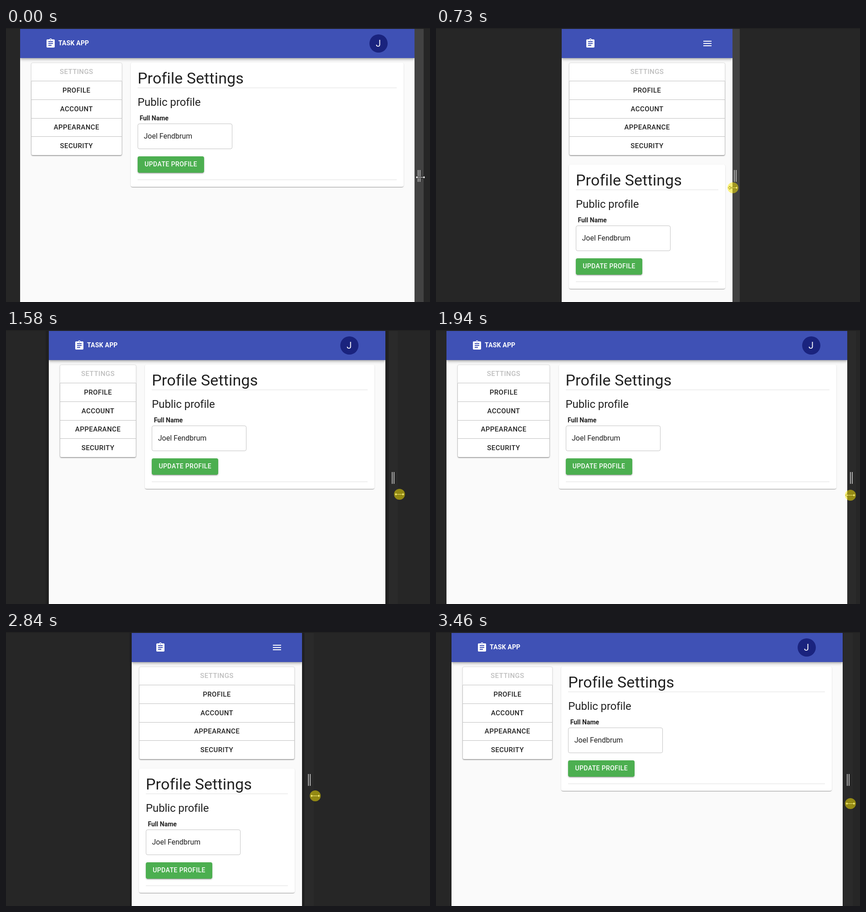
An HTML page that plays this animation: 931x602 px, repeating every 3490 ms.

```html
<!DOCTYPE html>
<html lang="en">
<head>
<meta charset="utf-8">
<title>Responsive profile page</title>
<style>
html, body { margin: 0; width: 100%; height: 100%; overflow: hidden; background: #262626; }
body { position: relative; font-family: Roboto, sans-serif; color: rgba(0,0,0,.87);
  --nav: max(143px, (100% - 68px) / 4);
  --low: 0 2px 1px -1px rgba(0,0,0,.2), 0 1px 1px rgba(0,0,0,.14), 0 1px 3px rgba(0,0,0,.12);
  --mid: 0 3px 1px -2px rgba(0,0,0,.2), 0 2px 2px rgba(0,0,0,.14), 0 1px 5px rgba(0,0,0,.12);
  --high: 0 2px 4px -1px rgba(0,0,0,.2), 0 4px 5px rgba(0,0,0,.14), 0 1px 10px rgba(0,0,0,.12); }
body * { position: absolute; box-sizing: border-box; white-space: nowrap; }
#top { left: 0; top: 0; width: 100%; height: 2px; background: #212121; }
#back { top: 2px; bottom: 0; background: #202020; }
#strip { top: 2px; bottom: 0; width: 20px; background: #2a2a2a; }
#strip.lit { background: #424242; }
#strip b { left: 7px; top: 310px; width: 6px; height: 26px; border: solid #adadad; border-width: 0 2px; }
#page { top: 2px; bottom: 0; background: #fafafa; overflow: hidden; }

header { left: 0; top: 0; width: 100%; height: 64px; background: #3f51b5; color: #fff; box-shadow: var(--high); }
header svg { width: 24px; height: 24px; top: 20px; fill: #fff; }
#clip { left: 55px; }
#brand { left: 84px; top: 19px; font: 700 14px/24px Roboto, sans-serif; letter-spacing: .2px; }
#face { right: 59.5px; top: 12px; width: 40px; height: 40px; border-radius: 50%; background: #1a237e;
  font-size: 20px; line-height: 40px; text-align: center; }
#menu { right: 43.5px; display: none; }

nav { left: 24px; top: 74px; width: var(--nav); height: 204px; border-radius: 4px; background: #fff; box-shadow: var(--low); }
nav span { left: 0; width: 100%; height: 41px; top: calc(var(--i) * 40.75px); border: 1px solid #c0c0c0; border-top: 0;
  font: 500 15px/40px Roboto, sans-serif; letter-spacing: .43px; text-align: center; }
nav span:first-child { color: rgba(0,0,0,.26); border-color: #e0e0e0 #e0e0e0 #c0c0c0; border-top: 1px solid #e0e0e0;
  border-radius: 4px 4px 0 0; line-height: 39px; }
nav span:last-child { border-radius: 0 0 4px 4px; }

main { left: calc(43.5px + var(--nav)); right: 24px; top: 74px; height: 273px; border-radius: 4px; background: #fff; box-shadow: var(--low); }
main > * { left: 15px; margin: 0; }
h1 { top: 14px; font: 400 34px/40px Roboto, sans-serif; letter-spacing: .12px; }
h2 { top: 71px; font: 400 24px/32px Roboto, sans-serif; letter-spacing: -.1px; }
hr { right: 15px; height: 1px; border: 0; background: rgba(0,0,0,.12); }
main label { left: 19.5px; top: 110px; font: 700 14px/24px Roboto, sans-serif; }
#field { top: 134px; width: 208px; height: 56px; border: 1px solid rgba(0,0,0,.23); border-radius: 4px;
  padding-left: 12.5px; font-size: 16px; line-height: 54px; }
#save { top: 205.5px; width: 146px; height: 36.5px; border-radius: 4px; background: #4caf50; color: #fff; text-align: center;
  font: 500 14px/35px Roboto, sans-serif; letter-spacing: .4px; box-shadow: var(--mid); }

.small #clip { left: 51px; }
.small #brand, .small #face { display: none; }
.small #menu { display: block; }
.small nav { left: 16px; width: calc(100% - 32px); }
.small main { left: 16px; right: 16px; top: 298px; }

#cursor { left: -13px; top: -13px; width: 26px; height: 26px; }
</style>
</head>
<body>
<div id="top"></div>
<div id="back"></div>
<div id="strip"><b></b></div>
<div id="page">
  <nav></nav>
  <main>
    <h1>Profile Settings</h1>
    <hr style="top:55px">
    <h2>Public profile</h2>
    <label>Full Name</label>
    <div id="field">Joel Fendbrum</div>
    <div id="save">UPDATE PROFILE</div>
    <hr style="top:257px">
  </main>
  <header>
    <svg id="clip" viewBox="0 0 24 24"><path fill-rule="evenodd" d="M5 3H9.2A3 3 0 0 1 14.8 3H19A2 2 0 0 1 21 5V19A2 2 0 0 1 19 21H5A2 2 0 0 1 3 19V5A2 2 0 0 1 5 3ZM12 3A1 1 0 0 0 12 5A1 1 0 0 0 12 3ZM7 7V9H17V7ZM7 11V13H17V11ZM7 15V17H14V15Z"/></svg>
    <div id="brand">TASK APP</div>
    <div id="face">J</div>
    <svg id="menu" viewBox="0 0 24 24"><path d="M3 6H21V8H3ZM3 11H21V13H3ZM3 16H21V18H3Z"/></svg>
  </header>
</div>
<svg id="cursor" viewBox="-13 -13 26 26">
  <path d="M-10.5 0L-6.5 -4V-1H6.5V-4L10.5 0L6.5 4V1H-6.5V4Z" fill="#fff" stroke="#000" stroke-width=".8"/>
  <circle id="glow" r="12" fill="#ffeb00" opacity=".5"/>
</svg>
<script>
const LOOP = 3490, MID = 464, WIDE = 433, NARROW = 160;
const LAG = 15;   // page redraw behind the drag handle, ms
const LEAD = 40;  // pointer ahead of the page, ms
const $ = id => document.getElementById(id);

// drags of the handle: in, out, in, out
const strokes = [
  { at: 60, span: 880, dx: -283, dy: 27 },
  { at: 1010, span: 862, dx: 295, dy: 8 },
  { at: 1872, span: 850, dx: -295, dy: -5 },
  { at: 2631, span: 891, dx: 283, dy: 19 }
];

const ease = u => (1 - Math.cos(Math.PI * Math.min(1, Math.max(0, u)))) / 2;
const drag = (t, axis) => strokes.reduce((sum, s) => sum + s[axis] * ease((t - s.at) / s.span), 0);
const halfAt = t => Math.max(NARROW, WIDE + drag(t, 'dx'));

function place(el, half) {
  el.style.left = Math.floor(MID - half) + 'px';
  el.style.width = Math.round(2 * half) + 'px';
}

function draw(t) {
  const half = halfAt(t), want = halfAt(t + LAG);
  place($('page'), half);
  place($('back'), want);
  $('page').className = half < 300 ? 'small' : '';
  $('strip').style.left = Math.round(MID + want) + 'px';
  $('strip').className = t < strokes[0].at + strokes[0].span ? 'lit' : '';
  const x = MID + 13 + WIDE + drag(t + LEAD, 'dx'), y = 328 + drag(t, 'dy');
  $('cursor').style.transform = `translate(${Math.round(x)}px, ${Math.round(y)}px)`;
  $('glow').style.display = t < strokes[0].at ? 'none' : '';
}

['SETTINGS', 'PROFILE', 'ACCOUNT', 'APPEARANCE', 'SECURITY'].forEach((name, i) => {
  const row = document.createElement('span');
  row.textContent = name;
  row.style.setProperty('--i', i);
  document.querySelector('nav').append(row);
});

const start = performance.now();
function tick() {
  draw((performance.now() - start) % LOOP);
  requestAnimationFrame(tick);
}
tick();
</script>
</body>
</html>
```
